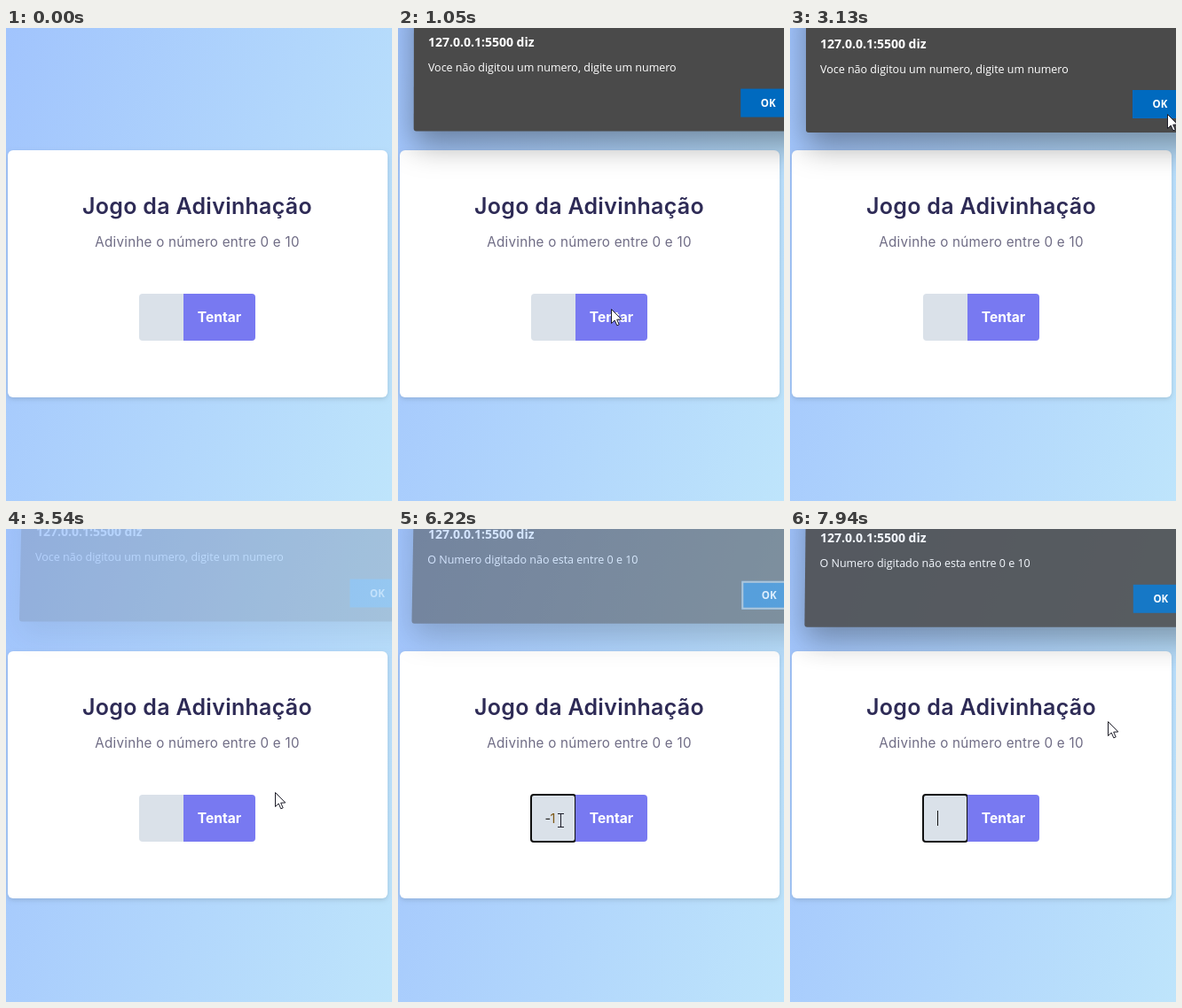
An HTML page with a canvas for the animation above (8 s loop, 435 by 534 pixels).

```html
<!DOCTYPE html>
<html lang="pt-BR">
<head>
<meta charset="utf-8">
<title>Jogo da Adivinhação</title>
<style>
html, body { margin: 0; width: 100%; height: 100%; overflow: hidden; background: #b0d4fc; }
canvas { display: block; }
</style>
</head>
<body>
<canvas id="stage" width="435" height="534"></canvas>
<script>
const W = 435, H = 534, LOOP = 8000, TICK = 70, BLINK = 530;
const stage = document.getElementById('stage').getContext('2d');
const layer = document.createElement('canvas');
layer.width = W;
layer.height = H;
const pane = layer.getContext('2d');

const UI = '"Open Sans", "Noto Sans", sans-serif';
const PAGE = 'Inter, sans-serif';

const dialogs = [
  { open: 940, close: 3400, text: 'Voce não digitou um numero, digite um numero' },
  { open: 6220, close: 7870, text: 'O Numero digitado não esta entre 0 e 10', keyboard: true }
];

// the pointer goes from spot to spot, bending towards a control point
const outside = [449, 565], tryButton = [240, 317], ok = [419, 80], field = [183, 329], away = [358, 217];
const moves = [
  { start: 100, end: 860, from: outside, via: [185, 250], to: tryButton },
  { start: 2570, end: 3330, from: tryButton, via: [464, 87], to: ok },
  { start: 3400, end: 3880, from: ok, via: [242, 468], to: field },
  { start: 6970, end: 7740, from: field, via: [430, 100], to: ok },
  { start: 7810, end: 7940, from: ok, via: [400, 140], to: away }
];

const focusAt = 4290, keysAt = [5290, 5550], typed = '-1';

function pointerAt(t) {
  const m = moves.findLast(m => m.start <= t);
  if (!m) return null;
  const span = m.end - m.start, steps = Math.round(span / 68);
  const step = Math.min(steps, Math.floor((t - m.start) / span * steps + .02));
  const u = (step + 1) / (steps + 1), v = 1 - u;
  return m.from.map((a, i) => Math.round(v * v * a + 2 * u * v * m.via[i] + u * u * m.to[i]));
}

// how far the dialog is raised above its resting place
function liftAt(d, t) {
  const age = from => Math.floor((t - from) / TICK) * TICK;
  if (t >= d.close) return 1 + age(d.close) / 10;
  return 12.5 * Math.max(0, 1 - age(d.open) / 140) ** 3;
}

function box(c, x, y, w, h, r, fill) {
  c.beginPath();
  c.roundRect(x, y, w, h, r);
  c.fillStyle = fill;
  c.fill();
}

function label(c, text, x, y, font, color, align = 'left', spacing = 0) {
  c.font = font;
  c.fillStyle = color;
  c.textAlign = align;
  c.letterSpacing = spacing + 'px';
  c.fillText(text, x, y);
}

function shadow(c, color, blur, dy) {
  c.shadowColor = color;
  c.shadowBlur = blur;
  c.shadowOffsetY = dy;
}

function drawField(c, t) {
  box(c, 150, 300, 50, 53, [4, 0, 0, 4], '#dae1e9');
  if (t < focusAt) return;
  c.beginPath();
  c.roundRect(150, 300, 50, 53, 3);
  c.lineWidth = 2;
  c.strokeStyle = '#101010';
  c.stroke();

  const [first, second] = dialogs;
  const cleared = t >= second.close;
  const count = cleared ? 0 : keysAt.filter(k => k <= t).length;
  for (let i = 0; i < count; i++) {
    label(c, typed[i], 165.5 + i * 6, 332, '400 14.6px ' + PAGE, i ? '#7d5714' : '#222');
  }
  const touched = [focusAt + TICK, ...keysAt, second.close].findLast(k => k <= t);
  const lit = (t - touched) % (2 * BLINK) < BLINK;
  if (lit && (t < second.open || cleared)) {
    c.fillStyle = '#111';
    c.fillRect(166 + Math.round(count * 5.4), 318, 1, 17);
  }
}

function drawPage(c, t) {
  const tilt = .32, len = 690 / (1 + tilt * tilt);
  const sky = c.createLinearGradient(0, 0, len, len * tilt);
  sky.addColorStop(0, '#a1c4fd');
  sky.addColorStop(1, '#c2e9fb');
  c.fillStyle = sky;
  c.fillRect(0, 0, W, H);

  c.save();
  shadow(c, 'rgba(0,0,0,.13)', 5, 2);
  box(c, 2, 138, 428, 279, 6, '#fff');
  c.restore();

  label(c, 'Jogo da Adivinhação', 215.5, 209.5, '600 25px ' + PAGE, '#2e2b56', 'center', .28);
  label(c, 'Adivinhe o número entre 0 e 10', 215.5, 247, '400 15.2px ' + PAGE, '#6f6c85', 'center', .24);

  drawField(c, t);
  box(c, 200, 300, 81, 53, [0, 4, 4, 0], '#7879f1');
  label(c, 'Tentar', 240.5, 332, '700 15.6px ' + PAGE, '#fff', 'center');
}

function drawDialog(c, d, t) {
  const lift = liftAt(d, t);
  const alpha = 1 - (lift / 16) ** 3;
  if (t < d.open || alpha <= 0) return;
  const left = 18 - lift * .2, base = 118 - lift * .9;
  c.clearRect(0, 0, W, H);
  c.save();
  shadow(c, 'rgba(0,0,0,.36)', 34, 16);
  c.beginPath();
  c.moveTo(18, -40);
  c.lineTo(W + 60, -40);
  c.lineTo(W + 60, base);
  c.lineTo(left + 3, base);
  c.quadraticCurveTo(left, base, left, base - 3);
  c.closePath();
  c.fillStyle = '#4a4a4a';
  c.fill();
  c.restore();

  label(c, '127.0.0.1:5500 diz', 34, 23 - lift, '700 14px ' + UI, '#fff');
  label(c, d.text, 34 - lift * .06, 51 - lift, '400 12.5px ' + UI, '#fff');
  const x = 386 + lift * .1, y = 70 - lift * .9;
  c.fillStyle = '#006abf';
  c.fillRect(x, y, 80, 32);
  if (d.keyboard && t < d.close - TICK) {
    c.strokeStyle = '#a8b4bc';
    c.lineWidth = 2;
    c.strokeRect(x + 1, y + 1, 80, 30);
  }
  label(c, 'OK', x + 31, y + 20, '700 11.5px ' + UI, '#fff', 'center');

  stage.globalAlpha = alpha;
  stage.drawImage(layer, 0, 0);
  stage.globalAlpha = 1;
}

function drawPointer(c, t) {
  const p = pointerAt(t);
  if (!p) return;
  const [x, y] = p;
  const inField = x >= 150 && x < 200 && y >= 300 && y < 353;
  c.save();
  c.translate(x, y);
  c.lineWidth = 1;
  c.strokeStyle = '#1c1c28';
  c.beginPath();
  if (inField) {
    for (const end of [-7.5, 7.5]) {
      c.moveTo(-3, end);
      c.lineTo(4, end);
    }
    c.moveTo(.5, -7.5);
    c.lineTo(.5, 7.5);
  } else {
    c.moveTo(.5, .5);
    [[.5, 16.5], [4.2, 13], [6.8, 18.8], [9.2, 17.8], [6.7, 12.2], [11.8, 12]]
      .forEach(q => c.lineTo(...q));
    c.closePath();
    c.fillStyle = '#fff';
    c.fill();
  }
  c.stroke();
  c.restore();
}

function frame(now) {
  const t = now % LOOP;
  drawPage(stage, t);
  dialogs.forEach(d => drawDialog(pane, d, t));
  drawPointer(stage, t);
  requestAnimationFrame(frame);
}

requestAnimationFrame(frame);
</script>
</body>
</html>
```
